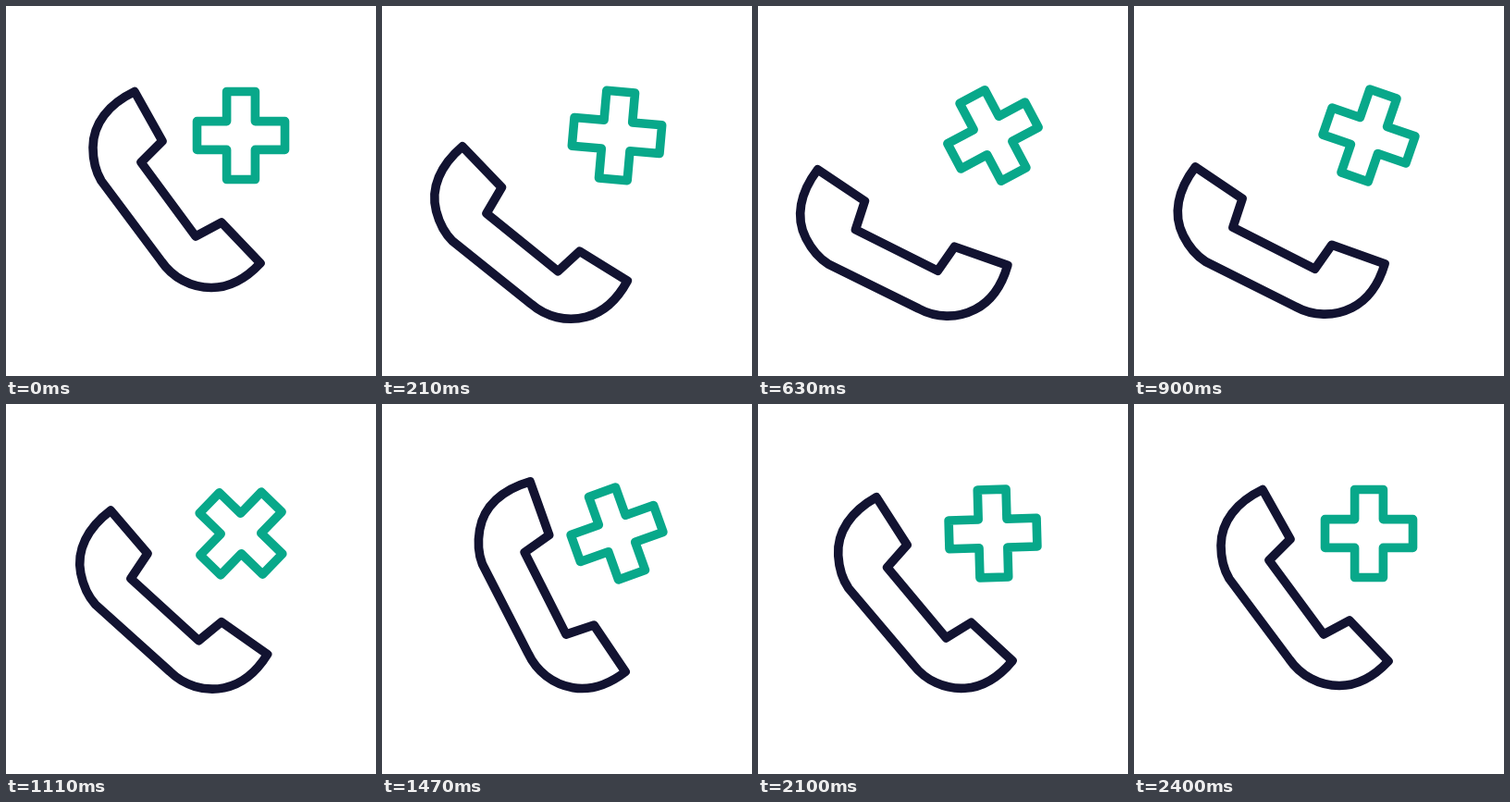
Animation, 400 px wide and 400 px high, one loop 4430 ms. Source, as an HTML page with a canvas:

```html
<!DOCTYPE html>
<html lang="en">
<head>
<meta charset="utf-8">
<title>Emergency call</title>
<style>
  html, body { margin: 0; width: 100%; height: 100%; overflow: hidden; background: #fff; }
  canvas { display: block; width: 400px; height: 400px; }
</style>
</head>
<body>
<canvas id="stage"></canvas>
<script>
const LOOP = 4430, STEP = 30, END = 2400;
const canvas = document.getElementById('stage');
const ctx = canvas.getContext('2d');
const dpr = window.devicePixelRatio || 1;
canvas.width = canvas.height = 400 * dpr;

const handset = new Path2D(
  'M139 92.5 L169 146 L146 169 L205 249 L233 234 L275 278 ' +
  'C261 293 243 304.5 222 304.5 C200 304.5 180 293.5 168 276 ' +
  'L103 189 C97 179 94 167 94 153 C94 127 111 106 139 92.5 Z');
const cross = new Path2D(
  'M-15.4 -47.5 H15.4 V-15.4 H47.5 V15.4 H15.4 V47.5 ' +
  'H-15.4 V15.4 H-47.5 V-15.4 H-15.4 Z');

const smooth = s => s * s * (3 - 2 * s);

// cubic-bezier(.333, 0, .2, 1)
function swift(x) {
  let lo = 0, hi = 1;
  for (let i = 0; i < 30; i++) {
    const s = (lo + hi) / 2, u = 1 - s;
    if (s * u * u + 0.6 * s * s * u + s * s * s < x) lo = s; else hi = s;
  }
  return smooth(lo);
}

// Each key: [time, value, easing towards it]
const turn = [
  [0, 0], [612, -27, swift], [870, -27, smooth],
  [1405, 10.3, smooth], [1920, -5.1, smooth], [END, 0, smooth]
];
const shiftX = [
  [0, 0], [380, -31.8, swift], [860, -31, smooth], [1240, 3.2, smooth],
  [1400, 3.2, smooth], [1920, -6.8, smooth], [END, 0, smooth]
];
const shiftY = [
  [0, 0], [380, 52.8, swift], [860, 51.5, smooth], [1240, -3.1, smooth],
  [1400, -3.1, smooth], [1920, 7.7, smooth], [END, 0, smooth]
];

function track(keys, t) {
  for (let i = 1; i < keys.length; i++) {
    const [t0, v0] = keys[i - 1], [t1, v1, ease] = keys[i];
    if (t < t1) return v0 + (v1 - v0) * ease((t - t0) / (t1 - t0));
  }
  return keys[keys.length - 1][1];
}

const rad = deg => deg * Math.PI / 180;

function outline(path, color) {
  ctx.strokeStyle = color;
  ctx.stroke(path);
}

function draw(t) {
  ctx.setTransform(dpr, 0, 0, dpr, 0, 0);
  ctx.fillStyle = '#fff';
  ctx.fillRect(0, 0, 400, 400);
  ctx.lineWidth = 9.6;
  ctx.lineJoin = 'round';

  ctx.save();
  ctx.translate(184.5 + track(shiftX, t), 198.5 + track(shiftY, t));
  ctx.rotate(rad(track(turn, t)));
  ctx.translate(-184.5, -198.5);
  outline(handset, '#121331');
  ctx.restore();

  ctx.save();
  ctx.translate(254, 140);
  ctx.rotate(rad(180 * swift(Math.min(t / END, 1))));
  outline(cross, '#08a88a');
  ctx.restore();
}

const start = performance.now();
function tick() {
  const t = (performance.now() - start) % LOOP;
  draw(Math.min(END, Math.floor(t / STEP) * STEP));
  requestAnimationFrame(tick);
}
tick();
</script>
</body>
</html>
```
